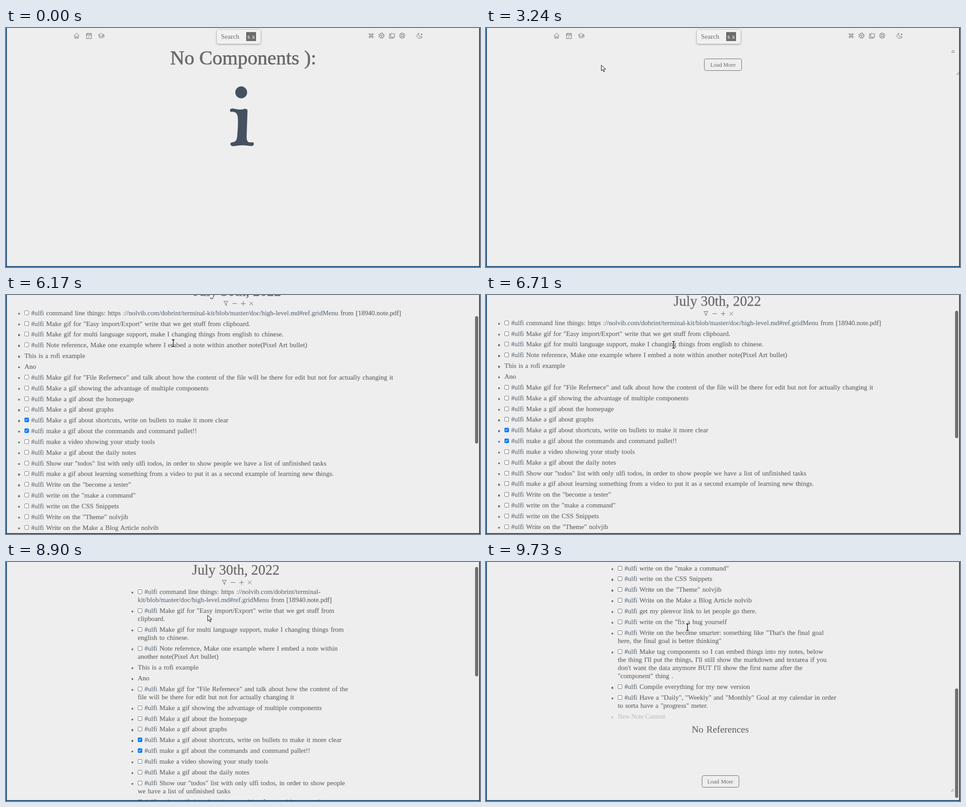
Write an HTML page that moves like this. It is 1054x531 px and loops after 9.76 s.

```html
<!DOCTYPE html>
<html lang="en">
<head>
<meta charset="utf-8">
<title>Daily notes</title>
<style>
html, body { margin: 0; width: 100%; height: 100%; overflow: hidden; background: #eee; }
body { position: relative; color: #696969; font: 15px/18.2px "Liberation Serif", serif; -webkit-text-stroke: .2px; }
svg { position: absolute; left: 0; top: 0; width: 1054px; height: 531px; overflow: visible; fill: none; stroke: #666; }
svg text { fill: #696969; stroke: none; }
.mid { text-anchor: middle; }
#doc { position: absolute; left: 0; top: 0; width: 1054px; }
#list { position: absolute; left: 41px; top: 113.8px; margin: 0; padding: 0; list-style: none; white-space: nowrap; word-spacing: 1.1px; }
li { position: relative; padding-bottom: 5.65px; }
li::before { content: ""; position: absolute; left: -14px; top: 9px; width: 4.4px; height: 4.4px; border-radius: 50%; background: #696969; }
li i { display: inline-block; position: relative; box-sizing: border-box; width: 10px; height: 10px; margin-right: 5px; border: 1px solid #767676; border-radius: 2px; background: #fff; vertical-align: 0; }
li i.on { background: #0075ff; border-color: #0075ff; }
li i.on::after { content: ""; position: absolute; left: 2.3px; top: -.3px; width: 2.2px; height: 5px; border: solid #fff; border-width: 0 1.6px 1.6px 0; transform: rotate(42deg); }
li b { font-weight: normal; color: #66727f; }
li br { display: none; }
li.new { opacity: .35; }
.narrow #list { left: 293px; }
.narrow li br { display: inline; }
.narrow #head, .narrow #ring { display: none; }
#foot { top: 100%; left: -41px; }
.narrow #foot { left: -293px; }
.narrow #title { transform: translateX(-3.6px); }
#thumb { position: absolute; left: 1043px; width: 7px; border-radius: 4px; background: #707070; }
#frame { position: absolute; inset: 0; border: 2px solid #1f4e79; border-top: 0; }
</style>
</head>
<body>
<svg id="head">
  <g id="left">
    <path d="M151 17.5l6-6 6 6M153 16v7h2.700v-4h2.600v4h2.700v-7"/>
    <path d="M179 12.500h11v11h-11zM179 15.500h11M182 10.500v3.500M187 10.500v3.500M184.500 18v3"/>
    <path d="M205 15.500l6.500-3.500 6.500 3.500-6.500 3.500zM207.500 17v4q4 2.500 8 0v-4M218 15.500v5"/>
  </g>
  <g id="center">
    <rect x="469" y="4" width="97" height="31" rx="4" style="fill:#f1f1f1;stroke:none;filter:drop-shadow(0 1px 2px #0006)"/>
    <text x="478" y="24">Search</text>
    <rect x="534" y="9" width="22" height="20" rx="1" style="fill:#6b6b6b;stroke:none"/>
    <text x="545" y="24" class="mid" style="fill:#fff;word-spacing:1px">s s</text>
  </g>
  <g id="right">
    <path d="M810 15h4v4h-4z"/>
    <circle cx="808.700" cy="13.700" r="1.600"/><circle cx="815.300" cy="13.700" r="1.600"/>
    <circle cx="808.700" cy="20.300" r="1.600"/><circle cx="815.300" cy="20.300" r="1.600"/>
    <circle cx="835" cy="17" r="2"/><circle cx="835" cy="17" r="5"/>
    <circle cx="835" cy="17" r="6" stroke-dasharray="2.350"/>
    <path d="M855.500 12h3l1 1h4.500v7.500h-8.500zM855 14h-2.500v9h8.500v-2"/>
    <circle cx="881" cy="17" r="6"/><circle cx="881" cy="17" r="2.700"/>
    <path d="M876.800 12.800l2.300 2.300M885.200 12.800l-2.300 2.300M876.800 21.200l2.300-2.300M885.200 21.200l-2.300-2.300"/>
    <path d="M918 11.500a6 6 0 1 0 7.500 8a6 6 0 0 1-7.500-8zM924 12v4M922 14h4"/>
  </g>
</svg>

<svg id="empty">
  <text x="527.500" y="81" class="mid" style="font-size:44px;stroke:#696969;stroke-width:.7px">No Components ):</text>
  <g style="fill:#455160;stroke:none">
    <circle cx="523" cy="143" r="13.200"/>
    <path d="M498 183Q499 178 506 179Q521 183 531 179.500Q537 179 537 184L535 242Q535 253 541 254H549Q552 255 551 259Q549 263 543 262Q525 259 510 262Q500 264 499 258Q499 254 503 254Q513 254 514 241Q517 208 515 196Q513 186 503 186Q498 187 498 183Z"/>
  </g>
</svg>

<svg id="blank">
  <circle cx="1038.500" cy="52.500" r="2.500"/>
  <rect x="485.500" y="68.500" width="83" height="26" rx="4"/>
  <text x="527" y="86" class="mid" style="font-size:12.600px">Load More</text>
  <path d="M1046 104l6-6M1049.500 104l2.500-2.500"/>
</svg>

<div id="doc">
  <svg id="title">
    <text x="514.500" y="85" class="mid" style="font-size:31.400px;stroke:#696969;stroke-width:.3px">July 30th, 2022</text>
    <path d="M484.500 97.500h9l-3.300 4.500v5l-2.400-2v-3zM503.500 102.500h10M522.500 102.500h10M527.500 97.500v10M541.500 98.500l8 8M549.500 98.500l-8 8"/>
  </svg>
  <svg id="ring"><circle cx="1027" cy="52.500" r="2.500"/></svg>
  <ul id="list"></ul>
</div>
<div id="thumb"></div>
<div id="frame"></div>
<svg id="cursor">
  <path id="arrow" d="M.5 .5V13l3-2.700 2.200 5 2-1-2.200-4.800H10z" style="fill:#fff;stroke:#000"/>
  <g id="beam">
    <path d="M-3-7.500h2l1 1 1-1h2M0-6.500v13M-3 7.500h2l1-1 1 1h2" style="stroke:#fff;stroke-width:2.600"/>
    <path d="M-3-7.500h2l1 1 1-1h2M0-6.500v13M-3 7.500h2l1-1 1 1h2" style="stroke:#000;stroke-width:1.300"/>
  </g>
  <path id="hand" d="M-1 9V1Q0-.8 1.300 1V6Q3 4.800 4 6.400Q5.600 5.500 6.300 7Q8 6.500 8 8.500V12L6.500 15.500H0L-4 10Q-3.500 7.500-1 9Z" style="fill:#fff;stroke:#000"/>
</svg>

<script>
const $ = id => document.getElementById(id);

// "-" open task, "+" done task, "|" line break in the narrow layout
const notes = `-command line things: https <b>://nolvib.com/dobrint/terminal-|kit/blob/master/doc/high-level.md#ref.gridMenu</b> from [18940.note.pdf]
-Make gif for "Easy import/Export" write that we get stuff from |clipboard.
-Make gif for multi language support, make I changing things from |english to chinese.
-Note reference, Make one example where I embed a note within |another note(Pixel Art bullet)
This is a rofi example
Ano
-Make gif for "File Refernece" and talk about how the content of the |file will be there for edit but not for actually changing it
-Make a gif showing the advantage of multiple components
-Make a gif about the homepage
-Make a gif about graphs
+Make a gif about shortcuts, write on bullets to make it more clear
+make a gif about the commands and command pallet!!
-make a video showing your study tools
-Make a gif about the daily notes
-Show our "todos" list with only ulfi todos, in order to show people |we have a list of unfinished tasks
-make a gif about learning something from a video to put it as a |second example of learning new things.
-Write on the "become a tester"
-write on the "make a command"
-write on the CSS Snippets
-Write on the "Theme" nolvjib
-Write on the Make a Blog Article nolvib
-get my plenvor link to let people go there.
-write on the "fix a bug yourself
-Write on the become smarter: something like "That's the final goal |here, the final goal is better thinking"
-Make tag components so I can embed things into my notes, below |the thing I'll put the things, I'll still show the markdown and textarea if you |don't want the data anymore BUT I'll show the first name after the |"component" thing .
-Compile everything for my new version
-Have a "Daily", "Weekly" and "Monthly" Goal at my calendar in order |to sorta have a "progress" meter.`;

$('list').innerHTML = notes.split('\n').map(line => {
  const text = line.replace(/^[-+]/, '').replaceAll('|', '<br>');
  const box = text.length && /^[-+]/.test(line) ? `<i class="${line[0] === '+' ? 'on' : ''}"></i><b>#ulfi</b> ` : '';
  return `<li>${box}${text}</li>`;
}).join('') + `<li class="new" style="font-size:14.100px;word-spacing:0">New Note Content</li>
<svg id="foot">
  <text x="521" y="21" class="mid" style="font-size:21.300px;stroke:#696969;stroke-width:.2px">No References</text>
  <rect x="480.500" y="116.500" width="82" height="26" rx="4"/>
  <text x="521" y="134" class="mid" style="font-size:12.600px">Load More</text>
  <path d="M1034 152l6-6M1037.500 152l2.500-2.500"/>
</svg>`;

// Each move: first step, last step, step count, then the values reached
const scrollMoves = [
  [5450, 6170, 12, 83.5], [6260, 6410, 4, 100], [6600, 6810, 3, 41.5],
  [8360, 8710, 5, 0], [8900, 8900, 1, 19], [9000, 9450, 5, 540],
  [9610, 9610, 1, 580], [9730, 9730, 1, 604]
];
const cursorMoves = [
  [1510, 1630, 4, 178, 18], [1810, 2040, 5, 215, 69], [2760, 3240, 11, 256, 82],
  [3580, 3780, 6, 343, 90], [4180, 4580, 9, 490.5, 83], [5050, 5090, 2, 541, 98],
  [5450, 6170, 12, 372, 107], [6260, 6810, 7, 435, 112], [7680, 7680, 1, 433, 108],
  [8360, 8710, 5, 448, 118], [9000, 9450, 5, 448, 145]
];
const shapes = [[1510, 'hand'], [1860, 'arrow'], [4400, 'beam'], [5050, 'hand'],
  [5500, 'beam'], [7680, 'arrow'], [9000, 'beam']];

function follow(moves, start, t) {
  let now = start;
  for (const [a, b, n, ...goal] of moves) {
    if (t < a) break;
    const k = b > a ? Math.min(1, (Math.floor((t - a) * (n - 1) / (b - a)) + 1) / n) : 1;
    now = now.map((v, i) => v + (goal[i] - v) * k);
  }
  return now;
}

const show = (id, on) => $(id).style.display = on ? '' : 'none';
const shift = (id, x, y = 0) => $(id).style.transform = `translate(${x}px,${y}px)`;

function draw(t) {
  const loaded = t >= 3960, narrow = t >= 7820;
  const [y] = follow(scrollMoves, [0], t);
  const [cx, cy] = follow(cursorMoves, [174, 19], t);

  document.body.className = narrow ? 'narrow' : '';
  show('empty', t < 1930);
  show('blank', t >= 1930 && !loaded);
  show('doc', loaded);
  show('thumb', loaded);

  shift('head', 0, -y);
  shift('left', loaded ? -1.5 : 0);
  shift('center', loaded ? -6 : 0);
  shift('right', loaded ? -10 : 0);
  shift('doc', 0, -y - (narrow ? 38 : 0));

  const size = narrow ? 243 : 283;
  $('thumb').style.height = size + 'px';
  $('thumb').style.top = 2 + y * size / 526 + 'px';

  const shape = shapes.findLast(s => t >= s[0])?.[1];
  for (const id of ['arrow', 'beam', 'hand']) show(id, id === shape);
  shift('cursor', cx, cy);
}

const begin = performance.now();
function tick() {
  draw((performance.now() - begin) % 9760);
  requestAnimationFrame(tick);
}
tick();
</script>
</body>
</html>
```
